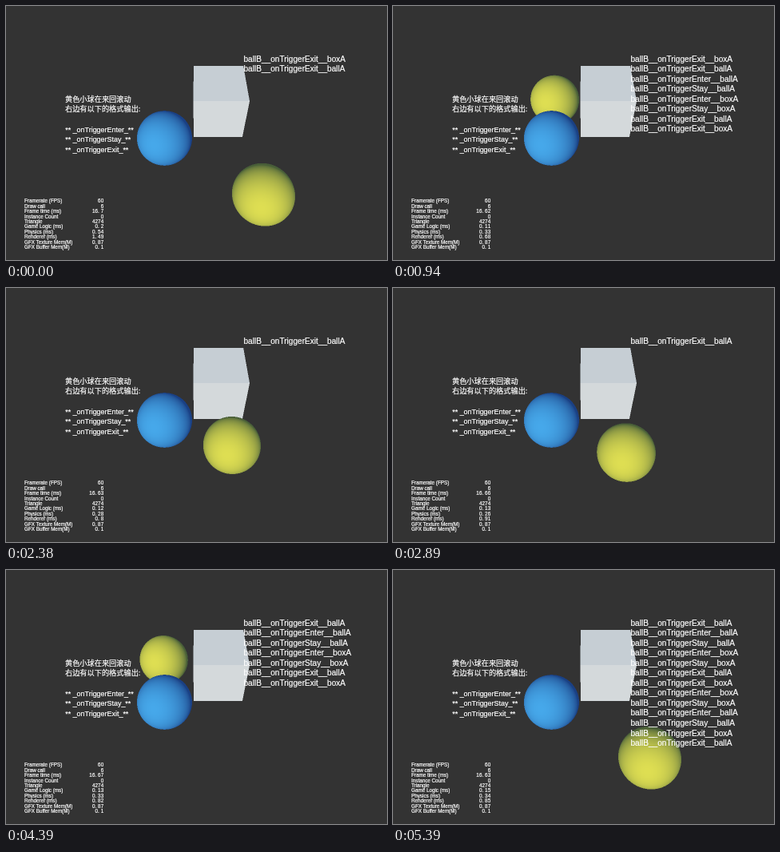
An HTML page with a canvas for the animation above (5.46 s loop, 477 by 318 pixels).

```html
<!DOCTYPE html>
<html lang="zh">
<head>
<meta charset="utf-8">
<title>Trigger demo</title>
<style>
  html, body { margin: 0; width: 100%; height: 100%; overflow: hidden; background: #333; }
  canvas, svg { position: absolute; left: 0; top: 0; width: 477px; height: 318px; }
  text { fill: #fff; stroke: #fff; stroke-width: .2px; font-family: "Liberation Sans", Arial, sans-serif; }
  .log { font-size: 10.1px; }
  .note { font-size: 8.95px; }
  .zh { font-size: 9.2px; font-family: "Noto Sans CJK SC", "Noto Sans CJK", sans-serif; }
  .stat { font-size: 6.3px; }
</style>
</head>
<body>
<canvas width="954" height="636"></canvas>
<svg viewBox="0 0 477 318"></svg>
<script>
const LOOP = 5460, SCALE = 2, W = 477 * SCALE, H = 318 * SCALE;

const knots = [[0, 0], [70, 1], [680, 10], [940, 14], [1290, 19], [1820, 26], [1880, 27],
  [2440, 35], [2890, 42], [2990, 43], [3580, 52], [3800, 55], [4130, 60], [4740, 69],
  [4930, 72], [5320, 78], [5390, 79], [LOOP, 80]];
const steps = [];
for (let i = 0; i < knots.length - 1; i++) {
  const [t0, n0] = knots[i], [t1, n1] = knots[i + 1];
  for (let k = 0; k < n1 - n0; k++) steps.push(t0 + (t1 - t0) * k / (n1 - n0));
}

// ---------- scene in camera space: x right, y up, z away ----------
const FOCAL = 347, RADIUS = 0.5, TILT = 50 * Math.PI / 180;
const COS = Math.cos(TILT), SIN = Math.sin(TILT);
const PERIOD = 2692, LEAD = 30;

const light = [-0.27, -0.22, -0.94];
const blue = { pos: [-0.581, -0.094, 5.084], dark: [26, 64, 132], lit: [70, 168, 234] };
const yellow = { dark: [72, 94, 56], lit: [222, 222, 82] };
const box = { corner: [-0.057, 0.568, 4.93], size: [1.002, 1.015, 1.025], top: [198, 206, 212], front: [212, 217, 219] };

const dot = (a, b) => a[0] * b[0] + a[1] * b[1] + a[2] * b[2];
const toBoxAxes = v => [v[0], -COS * v[1] + SIN * v[2], SIN * v[1] + COS * v[2]];
const ray = (px, py) => [(px + 0.5 - W / 2) / SCALE / FOCAL, (H / 2 - py - 0.5) / SCALE / FOCAL, 1];

function hitBall(d, pos) {
  const a = dot(d, d), b = dot(d, pos);
  const disc = b * b - a * (dot(pos, pos) - RADIUS * RADIUS);
  return disc < 0 ? Infinity : (b - Math.sqrt(disc)) / a;
}

function shade(ball, pos, d, z) {
  const n = d.map((v, i) => (v * z - pos[i]) / RADIUS);
  const k = Math.pow(Math.max(0, dot(n, light)), 0.85);
  return ball.dark.map((v, i) => v + (ball.lit[i] - v) * Math.min(1, k));
}

const boxEye = toBoxAxes(box.corner.map(v => -v));
function hitBox(d) {
  const dir = toBoxAxes(d);
  let near = -Infinity, far = Infinity, axis = 0;
  for (let i = 0; i < 3; i++) {
    const a = -boxEye[i] / dir[i], b = (box.size[i] - boxEye[i]) / dir[i];
    if (Math.min(a, b) > near) { near = Math.min(a, b); axis = i; }
    far = Math.min(far, Math.max(a, b));
  }
  return near < far ? { z: near, color: axis === 1 ? box.top : box.front } : null;
}

const ctx = document.querySelector('canvas').getContext('2d');
const base = ctx.createImageData(W, H);
const image = ctx.createImageData(W, H);
const depth = new Float32Array(W * H).fill(Infinity);

function put(img, i, c) {
  img.data[i * 4] = c[0];
  img.data[i * 4 + 1] = c[1];
  img.data[i * 4 + 2] = c[2];
  img.data[i * 4 + 3] = 255;
}

// Still parts are cast once, with their depth.
for (let y = 0; y < H; y++) {
  for (let x = 0; x < W; x++) {
    const i = y * W + x, d = ray(x, y);
    let color = [51, 51, 51];
    const zBall = hitBall(d, blue.pos), cube = hitBox(d);
    if (zBall < Infinity) { depth[i] = zBall; color = shade(blue, blue.pos, d, zBall); }
    if (cube && cube.z < depth[i]) { depth[i] = cube.z; color = cube.color; }
    put(base, i, color);
  }
}

// The ball rolls along a straight line at constant speed, there and back.
function yellowPos(t) {
  const phase = (t + LEAD) % PERIOD;
  const m = Math.min(phase, PERIOD - phase);
  return [1.137 - 0.00178 * m, -1.05 + 0.00179 * m, 4.494 + 0.00129 * m];
}

function drawScene(t) {
  const pos = yellowPos(t);
  image.data.set(base.data);
  const cx = W / 2 + SCALE * FOCAL * pos[0] / pos[2];
  const cy = H / 2 - SCALE * FOCAL * pos[1] / pos[2];
  const reach = 46 * SCALE;
  for (let y = Math.floor(cy - reach); y < cy + reach; y++) {
    for (let x = Math.floor(cx - reach); x < cx + reach; x++) {
      if (x < 0 || y < 0 || x >= W || y >= H) continue;
      const i = y * W + x, d = ray(x, y), z = hitBall(d, pos);
      if (z < depth[i]) put(image, i, shade(yellow, pos, d, z));
    }
  }
  ctx.putImageData(image, 0, 0);
}

// ---------- text ----------
const svg = document.querySelector('svg');
function label(x, y, cls, str = '') {
  const el = document.createElementNS('http://www.w3.org/2000/svg', 'text');
  el.setAttribute('x', x);
  el.setAttribute('y', y);
  el.setAttribute('class', cls);
  el.textContent = str;
  svg.append(el);
  return el;
}

label(74, 119.7, 'zh', '黄色小球在来回滚动');
label(74, 132.2, 'zh', '右边有以下的格式输出:');
['Enter', 'Stay', 'Exit'].forEach((s, i) => label(74.2, 157.7 + i * 12.6, 'note', `** _onTrigger${s}_**`));

// Trigger log: distance along the path (ms) at which each contact happens.
const MAX_LINES = 13, STAY = 17;
const outward = [[430, 'Enter', 'ballA'], [430 + STAY, 'Stay', 'ballA'], [510, 'Enter', 'boxA'],
  [510 + STAY, 'Stay', 'boxA'], [940, 'Exit', 'ballA'], [965, 'Exit', 'boxA']];
const inward = [[965, 'Enter', 'boxA'], [965 - STAY, 'Stay', 'boxA'], [940, 'Enter', 'ballA'],
  [940 - STAY, 'Stay', 'ballA'], [510, 'Exit', 'boxA'], [430, 'Exit', 'ballA']];
const message = (kind, body) => `ballB__onTrigger${kind}__${body}`;
const events = [];
for (const start of [-LEAD, PERIOD - LEAD]) {
  for (const [m, kind, body] of outward) events.push([start + m, message(kind, body)]);
  for (const [m, kind, body] of inward) events.push([start + PERIOD - m, message(kind, body)]);
}
const logRows = Array.from({ length: MAX_LINES }, (_, i) => label(297.5, 69.5 + i * 12.55, 'log'));

function drawLog(t) {
  let lines = [message('Exit', 'boxA'), message('Exit', 'ballA')];
  for (const [at, text] of events) {
    if (at > t) break;
    if (lines.length === MAX_LINES) lines = [];
    lines.push(text);
  }
  logRows.forEach((row, i) => { row.textContent = lines[i] || ''; });
}

// Statistics panel, refreshed twice a second.
const statNames = ['Framerate (FPS)', 'Draw call', 'Frame time (ms)', 'Instance Count', 'Triangle',
  'Game Logic (ms)', 'Physics (ms)', 'Renderer (ms)', 'GFX Texture Mem(M)', 'GFX Buffer Mem(M)'];
const samples = [
  [16.7, 0.2, 0.54, 1.49], [16.65, 0.15, 0.4, 0.95], [16.62, 0.11, 0.33, 0.68],
  [16.68, 0.14, 0.3, 0.79], [16.7, 0.15, 0.31, 0.84], [16.63, 0.12, 0.28, 0.8],
  [16.66, 0.13, 0.26, 0.91], [16.71, 0.14, 0.38, 0.73], [16.67, 0.13, 0.33, 0.82],
  [16.64, 0.14, 0.35, 0.9], [16.66, 0.16, 0.36, 0.98], [16.63, 0.15, 0.34, 0.85]];
const CELL = 3.6;
const statRows = statNames.map((name, i) => {
  const y = 246.3 + i * 6.42;
  label(23, y, 'stat', name);
  return label(0, y, 'stat');
});

function drawStats(t) {
  const [frame, logic, physics, render] = samples[t < 350 ? 0 : 1 + Math.floor((t - 350) / 500)];
  [60, 6, frame, 0, 4274, logic, physics, render, 0.87, 0.1].forEach((v, i) => {
    const s = String(v);
    statRows[i].textContent = s;
    statRows[i].setAttribute('x', [...s].map((_, k) => (122.3 - (s.length - k) * CELL).toFixed(1)).join(' '));
  });
}

// ---------- loop ----------
let shown = -1;
const began = performance.now();
function tick() {
  const t = (performance.now() - began) % LOOP;
  let step = steps.length - 1;
  while (step > 0 && steps[step] > t) step--;
  if (step !== shown) {
    shown = step;
    drawScene(steps[step]);
    drawLog(steps[step]);
    drawStats(steps[step]);
  }
  requestAnimationFrame(tick);
}
tick();
</script>
</body>
</html>
```
